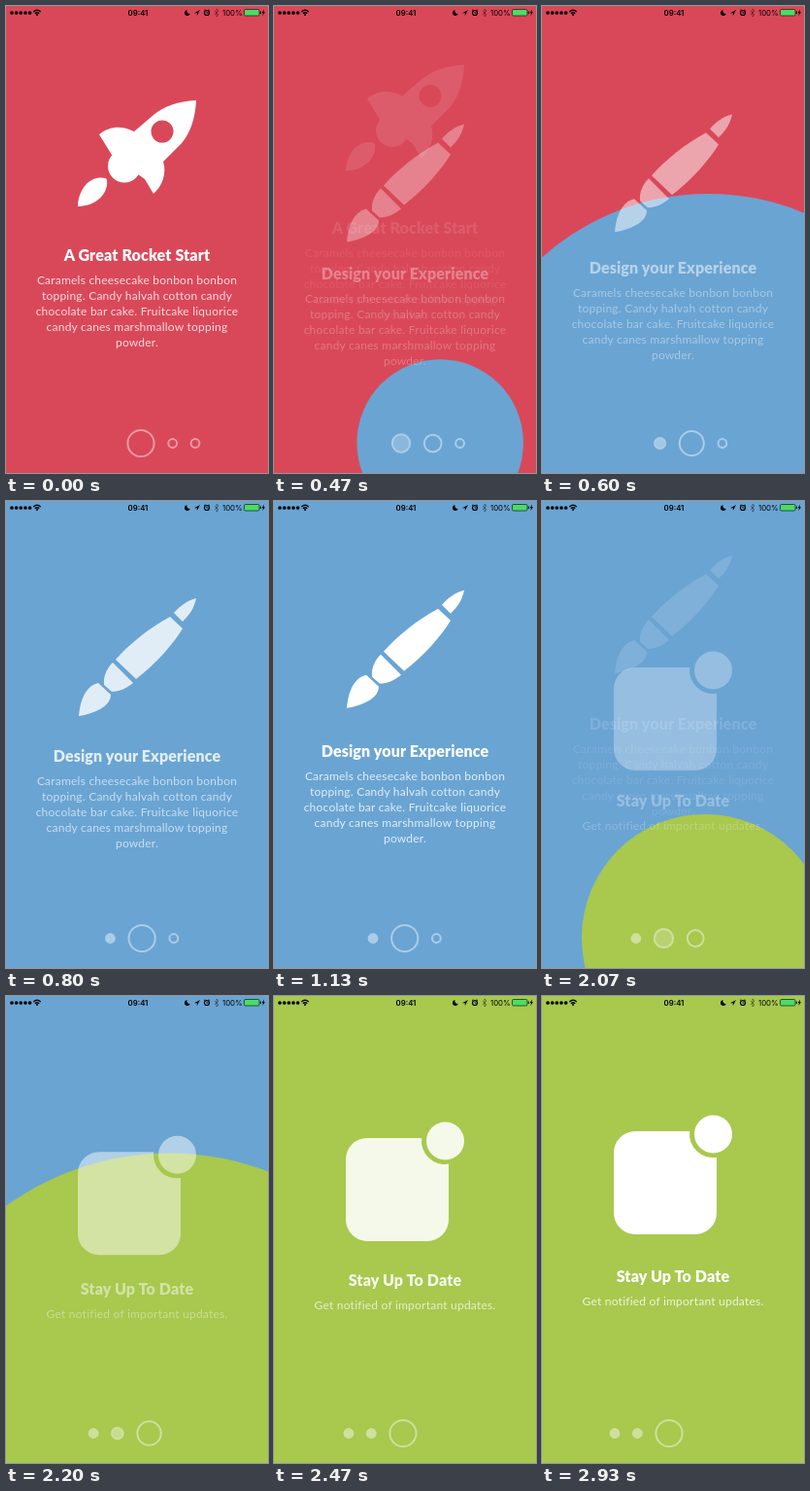
Write an HTML page that moves like this. It is 270 px wide and 480 px high and loops after 3.07 s.

```html
<!DOCTYPE html>
<html lang="en">
<head>
<meta charset="utf-8">
<title>Onboarding</title>
<style>
  html, body { margin: 0; height: 100%; overflow: hidden; }
  svg { display: block; width: 100vw; height: 100vh; background: #d94859; }
  .page { fill: #fff; text-anchor: middle; font-family: Lato, sans-serif; }
  .title { font-size: 16px; font-weight: 900; letter-spacing: .15px; }
  .body { font-size: 12px; letter-spacing: .22px; opacity: .8; }
  .dots { fill: #fff; stroke: #fff; stroke-width: 2; }
  .dots circle { opacity: .44; }
  .status { font: 7.8px Inter, sans-serif; }
  .line { fill: none; stroke: #000; }
</style>
</head>
<body>
<svg viewBox="0 0 270 480">
  <circle class="reveal" cx="171.2" cy="449" fill="#6aa4d3"/>
  <circle class="reveal" cx="168" cy="449" fill="#a8c84e"/>

  <g class="page">
    <g class="icon">
      <path fill-rule="evenodd" d="M196 97C177 98 163 103 152 112L132 129C119 122 105 124 96 132L109 153L143 178L152 193C161 185 166 172 162 160L181 141C190 130 195 116 196 97ZM149.500 129a11.500 11.500 0 1 0 23 0a11.500 11.500 0 1 0-23 0Z"/>
      <circle cx="122" cy="164.500" r="17"/>
      <path d="M74 206C74 195 80 182 90 178C96 176 104 176 104 179C105 185 102 194 95 199C89 204 80 206 74 206Z"/>
    </g>
    <g class="text"></g>
  </g>
  <g class="page">
    <g class="icon">
      <path d="M196 91C187 93 179 99 173 106L182 115C189 108 194 101 196 91Z"/>
      <path d="M169 110L182 122C173 137 155 158 134 174L113 154C126 139 148 121 169 110Z"/>
      <path d="M110 157C104 163 100 171 101 180L109 187C117 187 125 183 131 178Z"/>
      <path d="M75 212C76 200 80 182 95 178L108 190C108 201 94 209 75 212Z"/>
    </g>
    <g class="text"></g>
  </g>
  <g class="page">
    <g class="icon">
      <path d="M96 139H152.200A24 24 0 0 0 180 165.700V223A22 22 0 0 1 158 245H96A22 22 0 0 1 74 223V161A22 22 0 0 1 96 139Z"/>
      <circle cx="176.500" cy="142" r="19.500"/>
    </g>
    <g class="text"></g>
  </g>

  <g class="dots"><circle cy="449.500"/><circle cy="449.500"/><circle cy="449.500"/></g>

  <g class="status">
    <path class="line" stroke-width="3.700" stroke-linecap="round" stroke-dasharray="0 4.650" d="M6 7H25"/>
    <path class="line" stroke-width="1.300" d="M28.300 6Q32 2.600 35.700 6M29.800 7.700Q32 5.700 34.200 7.700"/>
    <circle cx="32" cy="9" r="1"/>
    <text x="136" y="9.800" text-anchor="middle" font-weight="600">09:41</text>
    <path d="M186.500 4A3 3 0 1 0 189.700 8A3 3 0 0 1 186.500 4Z"/>
    <path d="M200 4L194 7.200H196.800V10Z"/>
    <circle class="line" cx="207" cy="7" r="2.500" stroke-width="1.200"/>
    <path class="line" stroke-width=".8" d="M207 5.500V7.200H208.400M204 4.700L205.300 3.600M210 4.700L208.700 3.600"/>
    <path class="line" stroke-width=".7" opacity=".55" d="M214.800 5L219 9L217 11V3L219 5L214.800 9"/>
    <text x="223" y="9.800">100%</text>
    <rect x="245.500" y="3.500" width="15.500" height="6.500" rx="1.300" fill="#4cdc64" stroke="#000" stroke-width=".6"/>
    <rect x="261.700" y="5.500" width="1" height="2.500"/>
    <path d="M266 3.500L263.500 7.200H265L264.300 10L267 6.200H265.500Z"/>
  </g>
</svg>
<script>
const LOOP = 3070;
const dessert = [
  "Caramels cheesecake bonbon bonbon",
  "topping. Candy halvah cotton candy",
  "chocolate bar cake. Fruitcake liquorice",
  "candy canes marshmallow topping",
  "powder."
];
const copy = [
  { title: "A Great Rocket Start", lines: dessert, y: 262 },
  { title: "Design your Experience", lines: dessert, y: 262 },
  { title: "Stay Up To Date", lines: ["Get notified of important updates."], y: 294 }
];
const switches = [255, 1870];                // when each page change begins
const reveals = [[327, 430], [1860, 500]];   // start and duration of each colour circle
const firstDotX = [139, 102, 75];            // left end of the dot row on each page

const all = selector => [...document.querySelectorAll(selector)];
const icons = all(".icon"), texts = all(".text");
const circles = all(".reveal"), dots = all(".dots circle");

const progress = (t, start, duration) => Math.min(1, Math.max(0, (t - start) / duration));
const smooth = p => p * p * (3 - 2 * p);

texts.forEach((group, i) => {
  const { title, lines, y } = copy[i];
  const line = (kind, top, text) => `<text class="${kind}" x="135" y="${top}">${text}</text>`;
  group.innerHTML = line("title", y, title) +
    lines.map((text, n) => line("body", y + 24 + n * 16, text)).join("");
});

function drawPages(t) {
  icons.forEach((icon, i) => {
    const below = i > 0 ? (1 - progress(t, switches[i - 1], 1100)) ** 2.6 : 0;
    const shown = i > 0 ? progress(t, switches[i - 1], 680) : 1;
    const left = i < 2 ? 1 - progress(t, switches[i], 380) : 1;
    const place = (el, enter, leave) =>
      el.setAttribute("transform", `translate(0 ${enter * below - leave * (1 - left ** 2)})`);
    place(icon, 54, 45);
    place(texts[i], 34, 35);
    icon.parentNode.setAttribute("opacity", shown * left ** 2.6);
  });
}

function drawDots(t) {
  const passed = switches.map(s => smooth(progress(t, s, 440)));
  const sizes = [1 - passed[0], passed[0] - passed[1], passed[1]];
  let x = switches.reduce((sum, s, k) =>
    sum + smooth(progress(t, s, 720)) * (firstDotX[k + 1] - firstDotX[k]), firstDotX[0]);
  dots.forEach((dot, i) => {
    if (i > 0) x += 23.3 + 9.4 * (sizes[i - 1] + sizes[i]);   // a grown dot pushes its neighbours
    dot.setAttribute("cx", x);
    dot.setAttribute("r", 4.4 + 9.2 * sizes[i]);
    dot.setAttribute("fill-opacity", passed[i] ?? 0);
  });
}

function frame(now) {
  const t = now % LOOP;
  circles.forEach((circle, i) =>
    circle.setAttribute("r", 551 * progress(t, ...reveals[i]) ** 1.7));
  drawPages(t);
  drawDots(t);
  requestAnimationFrame(frame);
}
requestAnimationFrame(frame);
</script>
</body>
</html>
```
